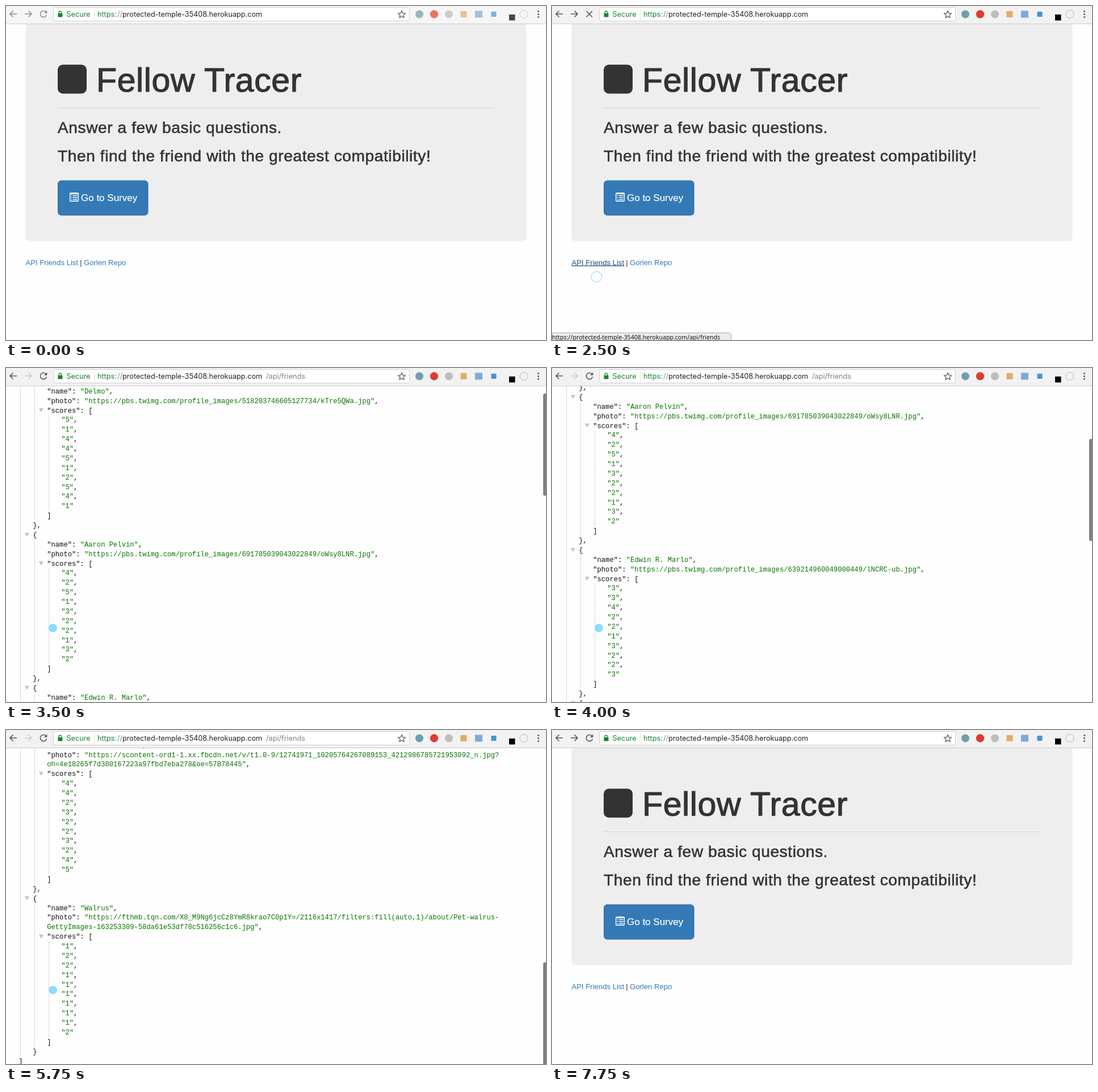
These frames come from a looping animation (951 by 589 pixels, 8 s). An HTML page:

```html
<!DOCTYPE html>
<html lang="en">
<head>
<meta charset="utf-8">
<title>Survey page</title>
<style>
html, body { margin: 0; width: 100%; height: 100%; overflow: hidden; background: #fefefe; }
svg { display: block; width: 100%; height: 100%; }
text { white-space: pre; }
.page { font-family: "Liberation Sans", Arial, sans-serif; font-size: 13.125px; fill: #333; }
.page .head { stroke: #333; paint-order: stroke; }
.page .link { fill: #337ab7; }
.page .link.hover { fill: #23527c; text-decoration: underline; }
.json { font: 12.1875px "Liberation Mono", "Courier New", monospace; fill: #111; }
.json .str { fill: #0b7500; }
.json .guide { stroke: #b4b4b4; stroke-dasharray: 1 1; }
.json .fold { fill: #c4c4c4; }
.bar { font: 12.66px Inter, Roboto, sans-serif; }
.ink { fill: none; stroke: #555; stroke-width: 1.6; }
.status { font: 10.6px "Noto Sans", sans-serif; }
</style>
</head>
<body>
<svg viewBox="0 0 951 589">
  <g class="page" id="home">
    <rect x="34.5" y="31.5" width="882" height="383" rx="5.6" fill="#eee"/>
    <rect x="91" y="103.500" width="51" height="51" rx="9"/>
    <text class="head" x="159" y="151" font-size="59" letter-spacing=".6" stroke-width="1.2">Fellow Tracer</text>
    <path d="M91 179.500H860" stroke="#d4d4d4"/>
    <g class="head" font-size="28.125" letter-spacing=".58" stroke-width=".6">
      <text x="91" y="224">Answer a few basic questions.</text>
      <text x="91" y="274">Then find the friend with the greatest compatibility!</text>
    </g>
    <rect x="91.500" y="308" width="158.500" height="61" rx="5.6" fill="#337ab7" stroke="#2e6da4"/>
    <g fill="none" stroke="#fff" stroke-width="1.4">
      <rect x="112.700" y="329.700" width="14.600" height="14.600" rx="1"/>
      <path d="M112 331H128" stroke-width="2"/>
      <path d="M115 334.500h1.500m1.500 0h7.500M115 338h1.500m1.500 0h7.500M115 341.500h1.500m1.500 0h7.500"/>
    </g>
    <text x="132" y="344" font-size="17" fill="#fff" stroke="#fff" stroke-width=".2">Go to Survey</text>
    <text class="link" id="api" x="34.500" y="456.500">API Friends List</text>
    <text x="130.200" y="456.500">|</text>
    <text class="link" x="137" y="456.500">Gorlen Repo</text>
  </g>

  <g id="list"><g class="json" id="json"></g></g>
  <rect id="thumb" x="946" width="8" height="180" rx="3" fill="#808080"/>

  <g class="bar">
    <rect id="strip" width="951" height="31" fill="#f2f2f2"/>
    <path d="M0 31.500H951" stroke="#cbcbcb"/>
    <path class="ink" id="back" d="M7 14H19M12.500 8.500L7 14l5.500 5.500"/>
    <path class="ink" id="next" d="M33 14H45M39.500 8.500L45 14l-5.500 5.500"/>
    <g id="reload">
      <path class="ink" d="M70 10.200A5.600 5.600 0 1 0 71.400 15.500"/>
      <path d="M72.300 7.500v5.300h-5.300z" fill="#555"/>
    </g>
    <path class="ink" id="stop" d="M60.500 9l10.500 10.500m0-10.500l-10.500 10.500"/>
    <rect x="83.500" y="2.500" width="627" height="24" rx="3" fill="#fff" stroke="#cfcfcf"/>
    <g fill="#1a8038">
      <rect x="91.500" y="13" width="8" height="6.500" rx=".8"/>
      <path d="M93.200 13.500v-2a2.300 2.300 0 0 1 4.600 0v2" fill="none" stroke="#1a8038" stroke-width="1.400"/>
      <text x="106.500" y="19">Secure</text>
      <text x="161" y="19">https:</text>
    </g>
    <path d="M155.500 5V25" stroke="#e4e4e4"/>
    <text x="205" y="19" text-anchor="end" fill="#888">//</text>
    <text x="205" y="19" fill="#222">protected-temple-35408.herokuapp.com</text>
    <text id="path" x="458" y="19" fill="#808080">/api/friends</text>
    <path d="M697 8.500l1.800 4.200 4.600.4-3.500 3 1.100 4.500-4-2.400-4 2.400 1.100-4.500-3.500-3 4.600-.4z" fill="none" stroke="#555" stroke-width="1.200"/>
    <g id="icons">
      <circle cx="728" cy="14.500" r="7" fill="#6f9fae"/>
      <circle cx="754" cy="14.500" r="7.200" fill="#e23b2e"/>
      <circle cx="780" cy="14.500" r="7" fill="#bdbdbd"/>
      <rect x="800.500" y="9" width="11" height="11" fill="#e2ac66"/>
      <rect x="826" y="8.500" width="13" height="12" fill="#7fa9d6"/>
      <rect x="854.500" y="10" width="9" height="9" fill="#4594d4"/>
      <rect x="886" y="15" width="10.500" height="10.500"/>
      <circle cx="912" cy="14.500" r="7" fill="none" stroke="#b5b5b5"/>
    </g>
    <path d="M937.500 9.500h0m0 5h0m0 5h0" stroke="#555" stroke-width="3" stroke-linecap="round"/>
  </g>

  <g class="status" id="status">
    <path d="M-1 590V576.500H312a3.500 3.500 0 0 1 3.500 3.500V590z" fill="#ededed" stroke="#aaa"/>
    <text x="0" y="588" fill="#111">https://protected-temple-35408.herokuapp.com/api/friends</text>
  </g>
  <circle id="dot" r="7.500" fill="#8edcff"/>
  <circle id="ring" r="9.300" fill="none" stroke="#a9e4f2" stroke-width="1.400"/>
</svg>

<script>
const $ = id => document.getElementById(id);
const ROW = 16.875, TOP = 47, INDENT = 25, LOOP = 8000, STEP = 250;

const friends = [
  ["Delmo", "5144512541", "https://pbs.twimg.com/profile_images/518203746605127734/kTre5QWa.jpg"],
  ["Aaron Pelvin", "4251322132", "https://pbs.twimg.com/profile_images/691785039043022849/oWsy8LNR.jpg"],
  ["Edwin R. Marlo", "3342213223", "https://pbs.twimg.com/profile_images/639214960049000449/lNCRC-ub.jpg"],
  ["Nolan Frey", "3421525314",
    "https://scontent-ord1-1.xx.fbcdn.net/v/t1.0-9/11830452_10306128745501968_3057741926630418275_n.jpg?",
    "oh=7b20914ac6e5831f0d42e98ab317c605&oe=57C10382"],
  ["Marvin Tolsen", "4423223245",
    "https://scontent-ord1-1.xx.fbcdn.net/v/t1.0-9/12741971_10205764267089153_4212986785721953092_n.jpg?",
    "oh=4e18265f7d380167223a97fbd7eba278&oe=57B78445"],
  ["Walrus", "1221111112",
    "https://fthmb.tqn.com/X8_M9Ng6jcCz8YmR8krao7C0p1Y=/2116x1417/filters:fill(auto,1)/about/Pet-walrus-",
    "GettyImages-163253309-58da61e53df78c516256c1c6.jpg"]
];

let row = 0, markup = "";
const left = depth => 22.2 + depth * INDENT;
const mid = r => TOP + r * ROW;
const str = s => `<tspan class="str">${s.replace(/&/g, "&amp;")}</tspan>`;
const line = (depth, s) => {
  markup += `<text x="${left(depth)}" y="${mid(row++) + 4}">${s}</text>`;
};
const fold = depth => {
  markup += `<path class="fold" d="M${left(depth) - 14.3} ${mid(row) - 3.5}h8l-4 7z"/>`;
};
const guide = (depth, from, to) => {
  const x = depth * INDENT + 25.5;
  markup += `<path class="guide" d="M${x} ${mid(from) + 8.5}V${mid(to) - 8.5}"/>`;
};

fold(0);
line(0, "[");
friends.forEach(([name, scores, ...photo], i) => {
  const start = row;
  fold(1);
  line(1, "{");
  line(2, `"name": ${str(`"${name}"`)},`);
  const url = `"${photo.join("\n")}"`.split("\n");
  url.forEach((part, k) =>
    line(2, (k ? "" : '"photo": ') + str(part) + (k == url.length - 1 ? "," : "")));
  const open = row;
  fold(2);
  line(2, '"scores": [');
  [...scores].forEach((n, k) => line(3, str(`"${n}"`) + (k < 9 ? "," : "")));
  guide(2, open, row);
  line(2, "]");
  guide(1, start, row);
  line(1, i < friends.length - 1 ? "}," : "}");
});
guide(0, 0, row);
line(0, "]");
$("json").innerHTML = markup;

// Each key is [time, value, ...]; values between keys are linear.
const scrollKeys = [[3250, 0], [3500, 40], [3750, 150], [4000, 283], [4250, 480], [4500, 740],
  [4750, 979], [5000, 1060], [5250, 1110], [5500, 1140], [5750, 1151]];
const cursorKeys = [[500, 930, 380], [1500, 300, 410], [2000, 90, 470], [2250, 78.5, 477.5],
  [2750, 78.5, 477.5], [3250, 82.5, 458.5], [6000, 82.5, 458.5], [6500, 55, 230], [7000, 14, 26]];

function at(keys, t) {
  const i = keys.findIndex(k => k[0] > t);
  if (i < 1) return (i ? keys[keys.length - 1] : keys[0]).slice(1);
  const a = keys[i - 1], b = keys[i], p = (t - a[0]) / (b[0] - a[0]);
  return a.slice(1).map((v, k) => v + (b[k + 1] - v) * p);
}
const show = (id, on) => $(id).style.display = on ? "" : "none";

function draw(now) {
  const t = Math.floor(now % LOOP / STEP) * STEP;
  const within = (a, b) => t >= a && t < b;
  const active = t >= 500, api = within(2750, 7250);
  const [scroll] = at(scrollKeys, t), [x, y] = at(cursorKeys, t);
  const click = within(2500, 3000) || within(7250, 7500);

  show("home", !api);
  show("path", api);
  show("list", within(3000, 7250));
  $("json").setAttribute("transform", `translate(0 ${-scroll})`);
  show("thumb", within(3500, 6250));
  $("thumb").setAttribute("y", 32 + scroll / 3.046);

  $("strip").setAttribute("fill", active ? "#f2f2f2" : "#f6f6f6");
  $("icons").style.opacity = active ? 1 : .7;
  $("back").style.opacity = active ? 1 : .65;
  $("next").style.opacity = api ? .25 : active ? 1 : .65;
  $("reload").style.opacity = active ? 1 : .65;
  show("reload", t != 2500);
  show("stop", t == 2500);

  $("api").classList.toggle("hover", within(2250, 2750));
  show("status", within(2250, 3000));
  show("dot", within(500, 7250) && !click);
  show("ring", click);
  $("ring").style.opacity = t == 2750 ? .65 : 1;
  for (const id of ["dot", "ring"]) $(id).setAttribute("transform", `translate(${x} ${y})`);
}

const begin = performance.now();
function tick() {
  draw(performance.now() - begin);
  requestAnimationFrame(tick);
}
tick();
</script>
</body>
</html>
```
